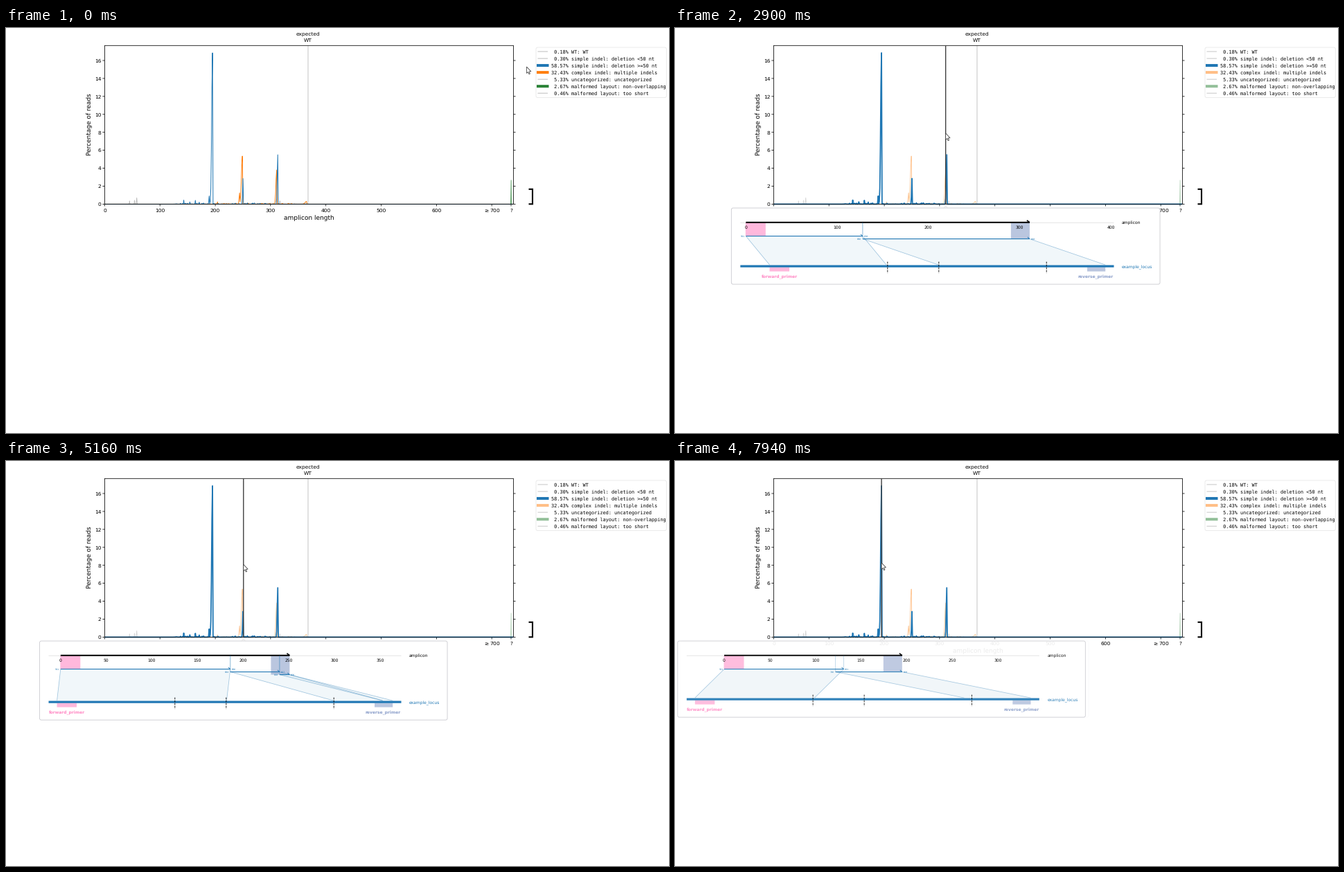
These frames come from a looping animation (957x585 px, 8000 ms). A matplotlib script:

```python
import numpy as np
import matplotlib.pyplot as plt
from matplotlib.animation import FuncAnimation
from matplotlib.patches import FancyBboxPatch, Polygon, Rectangle

W, H = 957, 585
PX = 0.72  # points per pixel at 100 dpi
INTERVAL, FRAMES = 40, 200
BLUE, ORANGE, GREEN, GRAY = "#1f77b4", "#ff7f0e", "#2a8236", "#bdbdbd"
FORWARD, REVERSE = "#ff8ac5", "#8da0cb"
LEFT, RIGHT, TOP, BASE = 142.4, 732.5, 25.3, 254.4
BASE_PX, LOCUS = 1.317, 368  # popup pixels per base, bases between the primers

plt.rcParams["text.hinting"] = "none"
fig = plt.figure(figsize=(W / 100, H / 100), dpi=100, facecolor="white")
ax = fig.add_axes([0, 0, 1, 1])
ax.set(xlim=(0, W), ylim=(H, 0))
ax.axis("off")


def line(xs, ys, color="black", width=1, **kw):
    kw.setdefault("solid_capstyle", "butt")
    return ax.plot(xs, ys, color=color, lw=width * PX, snap=False, **kw)[0]


def text(x, y, s, size, ha="center", color="black", family="DejaVu Sans", **kw):
    """Place text so that its capitals are centred on y."""
    return ax.text(x, y + 0.365 * size, s, fontsize=size * PX, ha=ha,
                   va="baseline", color=color, family=family, **kw)


def rounded(x0, y0, x1, y1, edge, **kw):
    return ax.add_patch(FancyBboxPatch(
        (x0, y0), x1 - x0, y1 - y0, boxstyle="round,pad=0,rounding_size=2.5",
        fc="white", ec=edge, lw=0.8 * PX, **kw))


def to_x(length):
    return LEFT + 0.7983 * np.asarray(length)


def to_y(percent):
    return BASE - 12.965 * np.asarray(percent)


def spectrum(peaks, color, z, noise):
    """Each peak (length, height, width) rises as a half Gaussian and drops sharply."""
    lengths = np.arange(740)
    lo, hi, size = noise
    values = np.where((lengths >= lo) & (lengths < hi),
                      size * np.random.default_rng(lo).random(740) ** 6, 0)
    for at, height, width in peaks:
        rise = height * np.exp(-((lengths - at) / width) ** 2)
        values = np.maximum(values, np.where(lengths <= at, rise, 0))
    return line(to_x(lengths), to_y(values), color, 1, zorder=z)


# Chart
gray_curve = spectrum([(45, .35, .5), (54, .42, .5), (58, .7, .5), (317, .35, .8)],
                      GRAY, 3, (180, 370, .08))
orange_curve = spectrum([(204, .25, .8), (244, 1.25, 1.2), (249, 5.35, 2.3),
                         (311, 3.8, 1.8), (365, .3, 3.5)], ORANGE, 4, (200, 340, .12))
blue_curve = spectrum([(143, .45, .5), (154, .25, .5), (164, .42, .5), (171, .22, .5),
                       (189, .9, .8), (195, 16.85, 2), (250, 2.85, .9),
                       (313, 5.5, 1.35)], BLUE, 5, (120, 300, .15))
green_curve = line([728.6, 729.1, 729.4], [BASE, to_y(2.67), BASE], GREEN, .7, zorder=4)
line([436, 436], [TOP, BASE], "#c4c4c4", 1, zorder=2)

ax.add_patch(Rectangle((LEFT, TOP), RIGHT - LEFT, BASE - TOP, fill=False,
                       ec="black", lw=0.8 * PX, zorder=6, snap=False))
for value in range(0, 17, 2):
    y = to_y(value)
    line([LEFT - 3, LEFT], [y, y], width=0.8)
    line([RIGHT, RIGHT + 3], [y, y], width=0.8)
    text(137.5, y, value, 7.5, "right")
x_labels = [(to_x(n), str(n)) for n in range(0, 700, 100)]
x_labels += [(to_x(700), r"$\geq 700$"), (729, "?")]
for x, label in x_labels:
    line([x, x], [BASE, BASE + 3], width=0.8)
    text(x, 262.8, label, 7.5)
text(437.3, 273.6, "amplicon length", 9)
text(119.5 + 3.3, 139.5 - 3.3, "Percentage of reads", 9, rotation=90,
     rotation_mode="anchor")
text(436, 8.3, "expected", 7.5)
text(436, 16.8, "WT", 7.5)
line([754.5, 760, 760, 754.5], [232.8, 232.8, 254.3, 254.3], width=2.1,
     solid_joinstyle="miter")

# Legend
rounded(765, 28, 953.3, 100.5, "#e6e6e6")
legend = [("0.18", "WT: WT", GRAY), ("0.30", "simple indel: deletion <50 nt", GRAY),
          ("58.57", "simple indel: deletion >=50 nt", BLUE),
          ("32.43", "complex indel: multiple indels", ORANGE),
          ("5.33", "uncategorized: uncategorized", GRAY),
          ("2.67", "malformed layout: non-overlapping", GREEN),
          ("0.46", "malformed layout: too short", GRAY)]
faded = [(gray_curve, .6), (orange_curve, .42), (green_curve, .42)]
for row, (share, name, color) in enumerate(legend):
    y = 34 + 10.03 * row
    thick = color != GRAY
    handle = line([766 if thick else 767.5, 783.5 if thick else 782], [y, y], color,
                  4 if thick else 1)
    if color != BLUE:
        faded.append((handle, .5 if thick else .85))
    text(786.6, y, f"{share:>5}% {name}", 6.83, "left", family="DejaVu Sans Mono")

marker = line([0, 0], [TOP, BASE], "#404040", 1.4, zorder=15)
ARROW = np.array([(0, 0), (0, 9.4), (2.1, 7.5), (3.5, 10.7), (4.9, 10.1), (3.6, 7),
                  (6.4, 6.8)])
cursor = ax.add_patch(Polygon(ARROW, fc="white", ec="#3c3c3c", lw=0.8 * PX, zorder=40))


def draw_popup(length, cuts, overlap, alpha):
    """Amplicon above, locus below; the first read aligns left, the others right."""
    style = dict(zorder=20, alpha=alpha)
    soft = dict(zorder=20, alpha=0.4 * alpha)
    art = []
    end = length * BASE_PX

    # The amplicon is centred on the first cut site, 170.6 px into the locus.
    shift = end / 2 - 170.6
    margin = max(8, 12 - shift)
    half = (margin + shift + 497 + 79.5) / 2
    cx = to_x(length)
    bar0 = cx - half + 13
    amp = bar0 + margin
    locus = amp + shift
    bar1 = locus + 497

    starts = [0] + [cut - overlap for cut in cuts]
    stops = cuts + [length]
    read_ys = [300.6 + 4 * i for i in range(len(starts))]
    locus_y = read_ys[-1] + 39.5

    def put(kind, *args, **kw):
        art.append(kind(*args, **kw))

    def box(x, y, width, height, color):
        art.append(ax.add_patch(Rectangle((x, y), width, height, fc=color, ec="none",
                                          zorder=20, alpha=0.6 * alpha, snap=False)))

    put(rounded, cx - half, 260, cx + half, locus_y + 26, "#c6c6cc", **style)
    put(line, [cx - 3, cx, cx + 3], [260, 257.5, 260], "#e2e2e2", .8, **style)
    put(line, [bar0, bar1], [281.2, 281.2], "#dddddd", .8, **style)

    box(amp - .5, 281, 29, read_ys[0] - 281, FORWARD)
    box(amp + end - 27, 281, 27, read_ys[-1] - 281, REVERSE)
    box(locus, locus_y + 1.5, 28.5, 6, FORWARD)
    box(locus + 458.5, locus_y + 1.5, 26.2, 6, REVERSE)

    put(line, [amp, amp + end], [280.8, 280.8], "black", 2, **style)
    put(line, [amp + end - 4, amp + end], [277.8, 280.8], "black", 1.6, **style)
    for n in range(0, 401, 100 if length > 300 else 50):
        if amp + n * BASE_PX < bar1:
            put(text, amp + n * BASE_PX, 288, n, 6, **style)

    for start, stop, y in zip(starts, stops, read_ys):
        offset = LOCUS - length if start else 0
        x0, x1 = amp + start * BASE_PX, amp + stop * BASE_PX
        r0, r1 = (locus + (n + offset) * BASE_PX for n in (start, stop))
        bottom = locus_y - 2
        art.append(ax.add_patch(Polygon([(x0, y), (x1, y), (r1, bottom), (r0, bottom)],
                                        fc=BLUE, ec="none", zorder=20,
                                        alpha=0.06 * alpha)))
        for x, r, inner in ((x0, r0, start > 0), (x1, r1, stop < length)):
            put(line, [x, r], [y, bottom], BLUE, .8, **soft)
            if inner:
                put(line, [x, x], [281, y], BLUE, .7, **soft)
        put(line, [x0, x1], [y, y], BLUE, 1.1, **style)
        put(line, [x1 - 3, x1], [y - 2.6, y], BLUE, .9, **style)
        put(text, x0 - 1.5, y, 501 + start + offset, 3.2, "right", BLUE, **style)
        put(text, x1 + 1.5, y, 500 + stop + offset, 3.2, "left", BLUE, **style)

    put(line, [bar0, bar1], [locus_y, locus_y], BLUE, 3.2, **style)
    for x in (170.3, 244.3, 399.7):
        put(line, [locus + x] * 2, [locus_y - 6.5, locus_y + 10], "black", .9,
            ls=(0, (3, 1.5)), **style)
    put(text, bar1 + 11.5, 280.8, "amplicon", 6, "left", **style)
    put(text, bar1 + 11.5, locus_y, "example_locus", 6, "left", BLUE, **style)
    for x, name, color in ((14, "forward_primer", FORWARD),
                           (471, "reverse_primer", REVERSE)):
        put(text, locus + x, locus_y + 14, name, 6, color=color, weight="bold", **style)
    return art


# Hovered lengths: (appear, full, leave, length, cuts, overlap)
VISITS = [(2560, 2880, 3070, 311, [128], 0), (3110, 3290, 4020, 313, [128], 0),
          (4550, 4990, 4700, 262, [128, 252], 0), (4850, 5160, 6190, 251, [186, 240], 0),
          (6950, 7360, 7810, 201, [131], 8), (7830, 7960, 9000, 195, [131], 9)]
FADE_OUT = 150

# Cursor rests: (from, until, x, y), with an eased move between two rests
RESTS = [(0, 80, 751.5, 56), (690, 1490, 771.8, 54.5), (2260, 2340, 400, 146.7)]
RESTS += [(appear, leave, to_x(length), np.interp(length, [195, 311], [147, 152]))
          for appear, _, leave, length, *_ in VISITS]


def cursor_at(t):
    here = np.array(RESTS[0][2:])
    for (_, leave, *_), (arrive, _, *goal) in zip(RESTS, RESTS[1:]):
        u = np.clip((t - leave) / (arrive - leave), 0, 1)
        here = here + (np.array(goal) - here) * u * u * (3 - 2 * u)
    return here


popup_art = []


def update(frame):
    t = frame * INTERVAL + 30
    picked = np.interp(t, [1070, 1220], [0, 1])
    for artist, low in faded:
        artist.set_alpha(1 + (low - 1) * picked)
    blue_curve.set_linewidth((1 + 0.8 * picked) * PX)

    tip = cursor_at(t)
    cursor.set_xy(ARROW + tip)
    marker.set_xdata([tip[0], tip[0]])
    marker.set_visible(t >= 2340)

    while popup_art:
        popup_art.pop().remove()
    for appear, full, leave, *content in VISITS:
        alpha = min((t - appear) / (full - appear), 1 - (t - leave) / FADE_OUT, 1)
        if alpha > 0:
            popup_art.extend(draw_popup(*content, alpha))
    return []


anim = FuncAnimation(fig, update, frames=FRAMES, interval=INTERVAL, repeat=True,
                     repeat_delay=0, blit=False)
plt.show()
```
